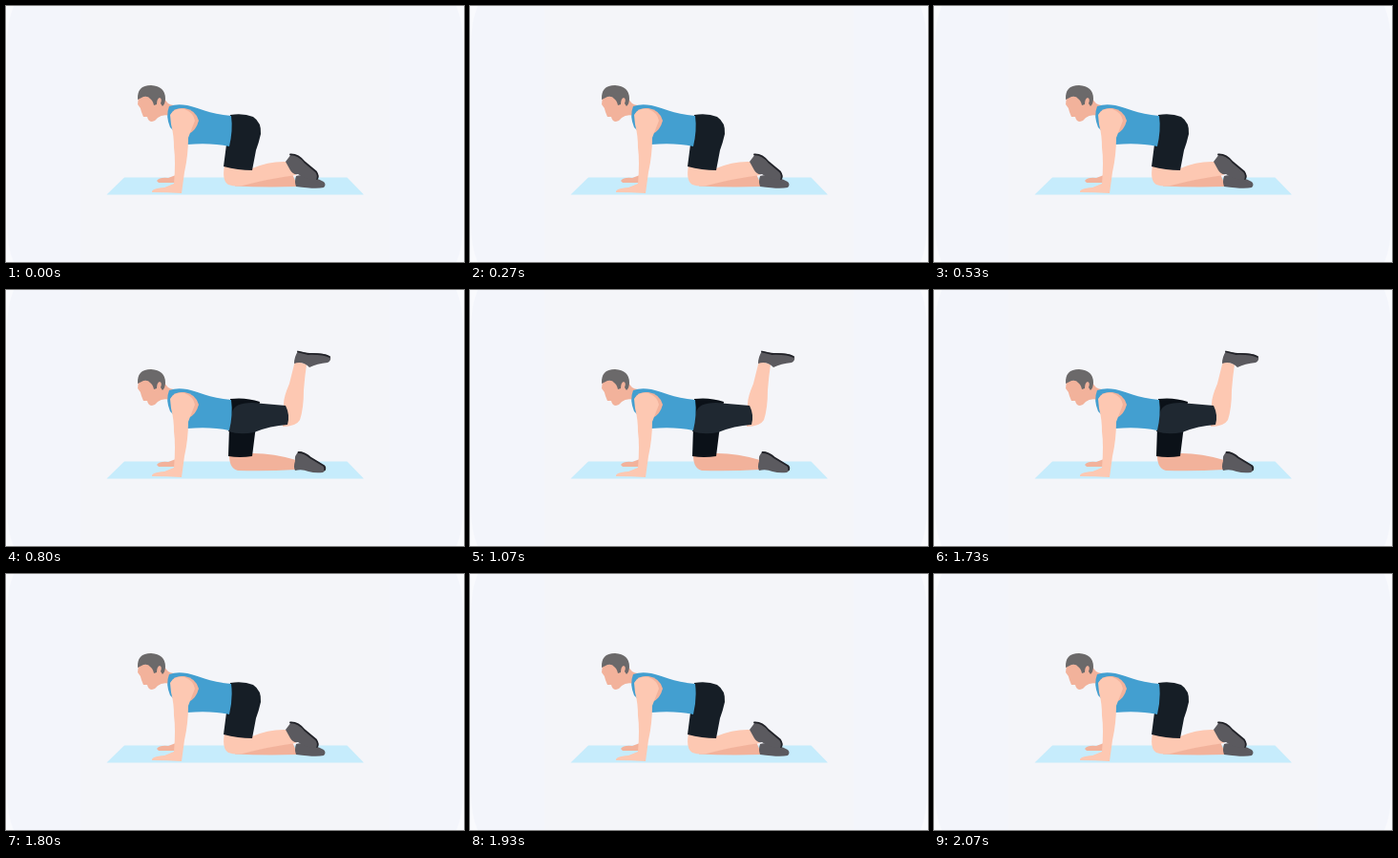
Recreate the animation shown at these times as an HTML page. Size 480 px wide and 268 px high, loop 2340 ms.

```html
<!DOCTYPE html>
<html lang="en">
<head>
<meta charset="utf-8">
<title>Donkey kick</title>
<style>
  html, body { margin: 0; width: 100%; height: 100%; overflow: hidden; background: #f9fafd; }
  svg { display: block; width: 100%; height: 100%; }
  .skin { fill: #fdc8b2; }
  .shade { fill: #f2b29b; }
  .shirt { fill: #439fd0; }
  .shorts { fill: #161e26; }
  .thigh { fill: #1f2831; }
  .dark { fill: #0b1118; }
  .shoe { fill: #5b5a5f; }
  .sole { fill: none; stroke: #222329; stroke-width: 1.8; stroke-linecap: round; stroke-linejoin: round; }
  .hair { fill: #6b696a; }
</style>
</head>
<body>
<svg viewBox="0 0 480 268">
  <path fill="#f3f5fb" d="M8 0H472Q479 18 479 40V228Q479 252 472 268H8Q1 252 1 228V40Q1 18 8 0Z"/>
  <rect x="78" width="324" height="268" fill="#f4f5f9"/>
  <path fill="#c6ecfc" d="M124 179.5H357.5L375 197.5H105.5Z"/>

  <g id="kneeling">
    <path class="shade" d="M240 185Q264 176 300 176L306 189Q270 190 240 188.5Z"/>
    <path class="shoe" d="M304 178Q309 176 314 179Q324 179 333 184Q336 187 333 190Q325 192 304 189Q302 184 304 178Z"/>
    <path class="skin" d="M229 167L258 170Q276 162 295 163L304 177Q275 181 252 187Q242 190 233 187Q226 183 229 167Z"/>
    <path class="shoe" d="M293 163L299 155Q306 155 312 163L325 173Q329 179 324 182Q314 182 306 176Q301 177 298 172Z"/>
    <path class="sole" d="M298 155.5Q306 155 313 163.5L325 173.5Q328 178 326 181"/>
    <path class="shorts" d="M235 114Q249 112 259 116Q268 122 267 134Q265 143 262 151L258 172Q243 172 228 168L231 145Z"/>
  </g>

  <g id="kicking">
    <path class="shade" d="M234 173L260 171Q280 171 304 178L304 188Q272 190 243 189Q234 187 234 173Z"/>
    <path class="shoe" d="M307 169Q313 170 319 175L334 184Q337 188 332 191Q324 192 317 190Q310 187 303 189Q301 185 303 179Q302 173 307 169Z"/>
    <path class="sole" d="M306.5 170Q313 170 319 175.5L333 184Q335 186 334 188"/>
    <path class="skin" d="M303 74L315 78Q313 91 312 105Q312 124 308 136Q304 143 290 143L291 119Q291 112 297 98Z"/>
    <path class="shoe" d="M306 64L318 66Q336 66 340 70Q341 74 337 76Q326 77 318 81Q311 74 302 77Q302 70 306 64Z"/>
    <path class="sole" d="M306 64.5L316 67Q333 66.5 339 70"/>
    <path class="dark" d="M235 114Q251 112 266 117L261 150L258 174Q245 176 233 174Z"/>
    <path class="thigh" d="M237 128Q239 118 258 118L293 121Q298 131 295 141Q277 142 260 149Q245 152 233 148Z"/>
  </g>

  <path class="shade" d="M158 183Q161 179 170 180L178 177V185H160Z"/>
  <path class="shade" d="M139 94L138 103Q141 106 142 111L144 116L148 116Q149 121 153 121Q157 120 159 117Q164 113 172 115L176 104Q168 103 166 96Z"/>
  <path class="hair" d="M138 98Q137 83 152 83Q167 84 167 97Q167 102 164 105L162 102Q164 97 161 96Q158 97 158 103L155 104Q154 99 151 97Q149 94 144 95Z"/>

  <path class="shirt" d="M171 105Q179 102 190 104C200 106 213 113 236 115Q238 130 234 147Q215 143 190 145L172 127Q167 115 171 105Z"/>
  <path class="shade" d="M173 113Q176 106 187 107Q199 109 202 120Q199 131 191 134L177 130Z"/>
  <path class="skin" d="M172 114Q177 106 187 108Q196 111 198 120Q194 130 191 138Q191 156 187 174L184 196Q169 195 153 195Q152 191 166 190L176 186Q178 163 176 148Q176 135 173 124Z"/>
</svg>
<script>
  const LOOP = 2340, KICK_START = 800, KICK_END = 1800;
  const kneeling = document.getElementById('kneeling');
  const kicking = document.getElementById('kicking');
  const start = performance.now();

  function draw(now) {
    const time = Math.max(0, now - start) % LOOP;
    const kicked = time >= KICK_START && time < KICK_END;
    kneeling.style.display = kicked ? 'none' : 'inline';
    kicking.style.display = kicked ? 'inline' : 'none';
    requestAnimationFrame(draw);
  }
  draw(start);
</script>
</body>
</html>
```
